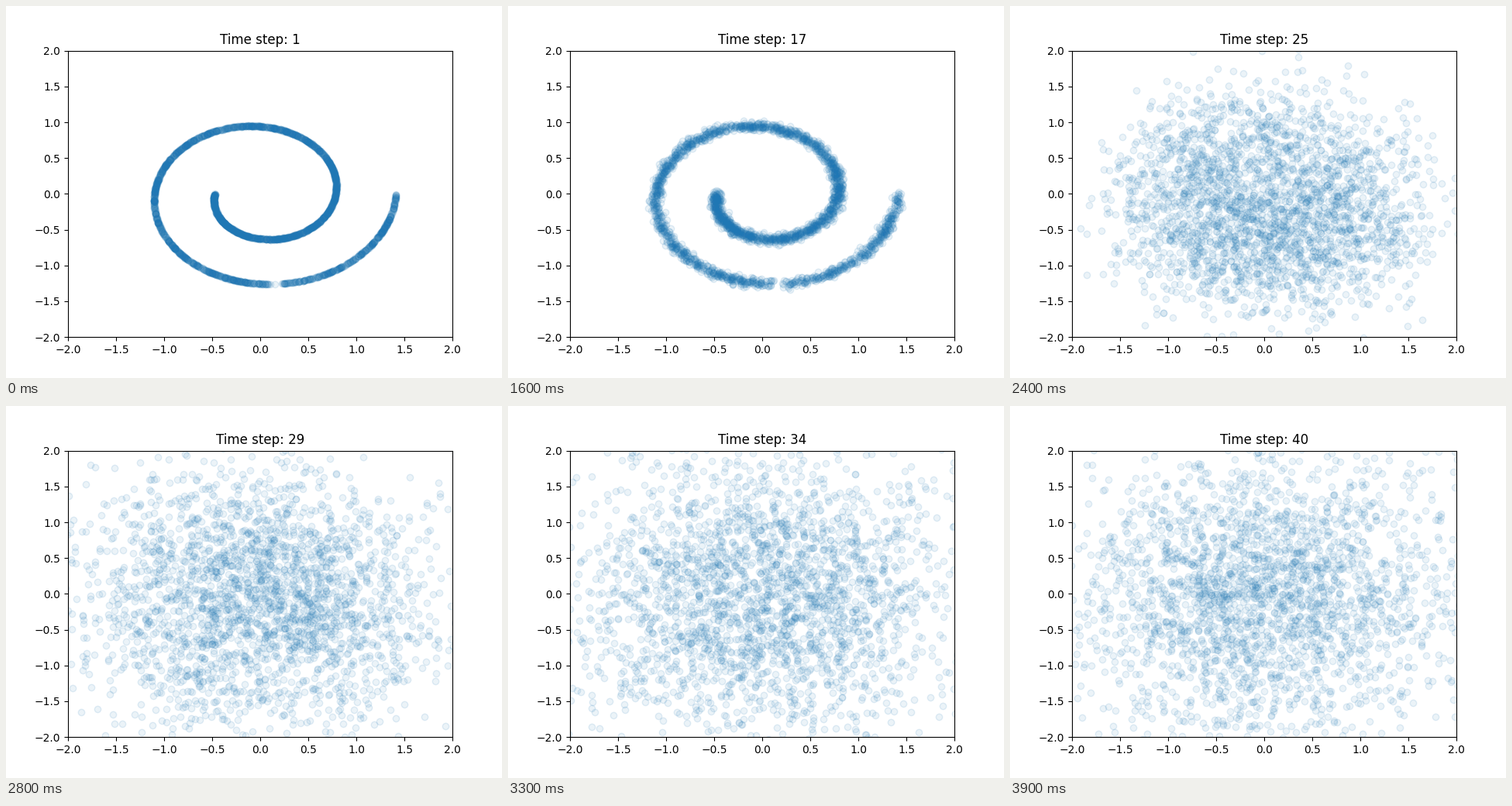
A matplotlib script that plays this animation: 640 by 480 pixels, repeating every 4 s.

```python
import numpy as np
import matplotlib.pyplot as plt
from matplotlib.animation import FuncAnimation
from matplotlib.colors import to_rgba

STEPS = 40
POINTS = 2600
BLUE = "#1f77b4"

# Sigmoid noise schedule of the forward diffusion
beta = 1e-5 + (0.3 - 1e-5) / (1 + np.exp(-np.linspace(-18, 10, STEPS)))
kept = np.cumprod(1 - beta)


def swiss_roll(n, rng):
    t = 1.5 * np.pi * (1 + 2 * rng.random(n))
    # The outer arm is sparse just past its lowest point
    offset = t - 4 * np.pi
    gap = (offset > 0.06) & (offset < 0.165) & (rng.random(n) < 0.9)
    t = t[~gap]
    return np.column_stack([t * np.sin(t), -t * np.cos(t)]) / 10


roll = swiss_roll(POINTS, np.random.default_rng(4))


def diffuse(step):
    noise = np.random.default_rng(100 + step).standard_normal(roll.shape)
    return np.sqrt(kept[step]) * roll + np.sqrt(1 - kept[step]) * noise


fig, ax = plt.subplots(figsize=(6.4, 4.8), dpi=100)
ax.set_xlim(-2, 2)
ax.set_ylim(-2, 2)
dots = ax.scatter(*roll.T, s=36, linewidths=1.0,
                  facecolors=[to_rgba(BLUE, 0.085)],
                  edgecolors=[to_rgba(BLUE, 0.12)])
title = ax.set_title("Time step: 1")


def draw(step):
    dots.set_offsets(diffuse(step))
    title.set_text(f"Time step: {step + 1}")
    return dots, title


anim = FuncAnimation(fig, draw, frames=STEPS, interval=100,
                     repeat=True, repeat_delay=0, blit=False)
plt.show()
```
